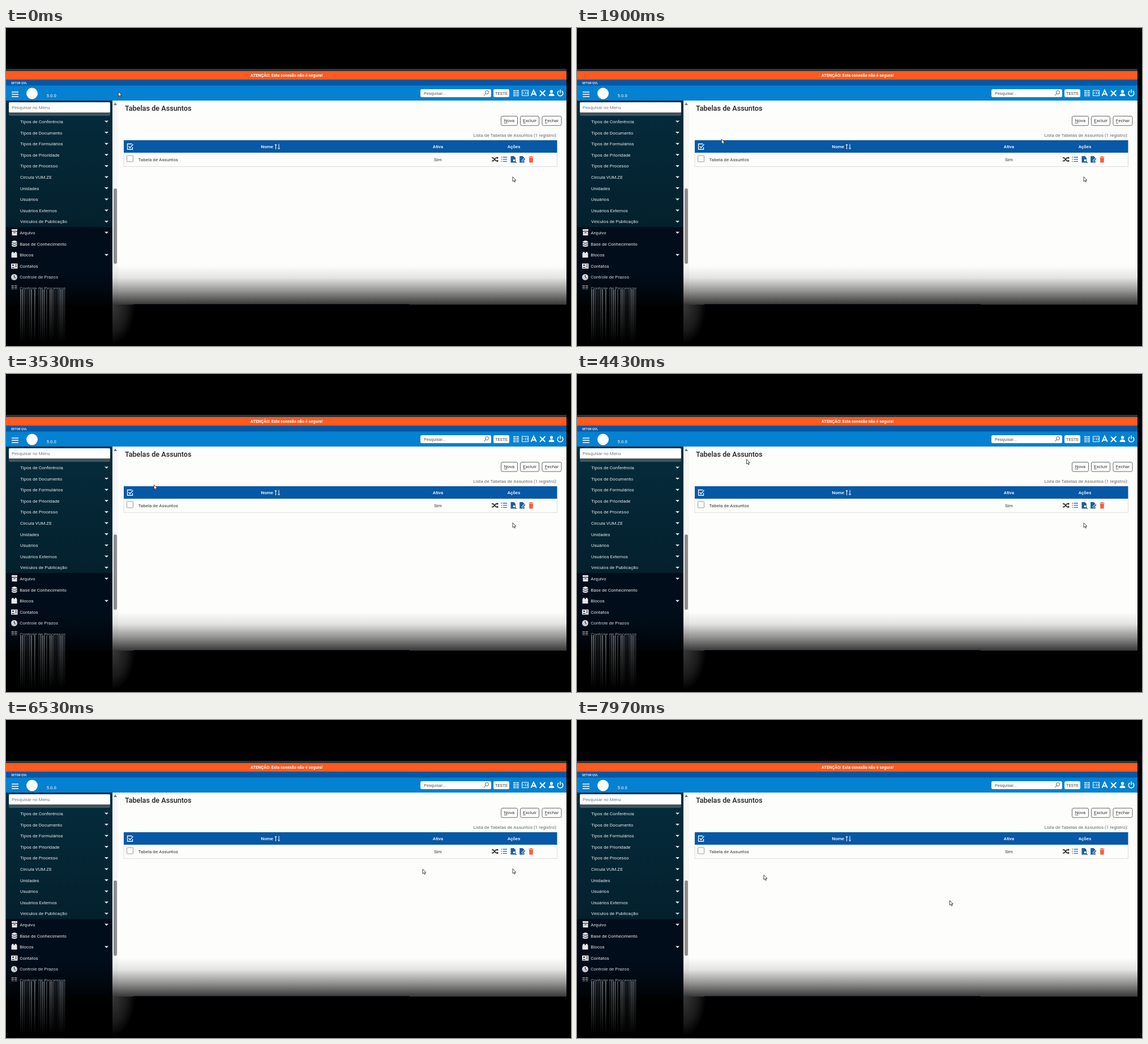
An HTML page for the animation above (8000 ms loop, 998 by 561 pixels).

```html
<!DOCTYPE html>
<html lang="pt-BR">
<head>
<meta charset="utf-8">
<style>
  html, body { margin: 0; width: 100%; height: 100%; overflow: hidden; background: #000; }
  svg { display: block; width: 998px; height: 561px; font: 8.05px Roboto, Arial, sans-serif; }
</style>
</head>
<body>
<svg viewBox="0 0 998 561">
  <defs>
    <linearGradient id="shade" x2="0" y2="1">
      <stop offset="0" stop-color="#000" stop-opacity="0"/>
      <stop offset=".3" stop-color="#000" stop-opacity=".1"/>
      <stop offset=".65" stop-color="#000" stop-opacity=".42"/>
      <stop offset="1" stop-color="#000" stop-opacity=".78"/>
    </linearGradient>
    <linearGradient id="smear" x2="0" y2="1">
      <stop offset="0" stop-color="#a9b0b5"/>
      <stop offset=".4" stop-color="#646a6e"/>
      <stop offset="1" stop-color="#000"/>
    </linearGradient>
    <linearGradient id="menu" x2="0" y2="1">
      <stop offset="0" stop-color="#052c3c"/>
      <stop offset="1" stop-color="#04202d"/>
    </linearGradient>
    <radialGradient id="glow" cx="0" cy="0" r="1">
      <stop offset="0" stop-color="#383838"/>
      <stop offset=".65" stop-color="#1a1a1a"/>
      <stop offset="1" stop-color="#000"/>
    </radialGradient>
    <clipPath id="menuClip"><path d="M0 128H188V461H0z"/></clipPath>
    <path id="arrow" d="M0 0V8.2L1.9 6.5 3.2 9.4 4.6 8.8 3.3 6H5.8z" fill="#fff" stroke="#333" stroke-width=".9"/>
  </defs>

  <!-- page and header -->
  <path d="M0 72H990V77H0z" fill="#303437"/>
  <path d="M0 76H990V91H0z" fill="#ff5a1f"/>
  <path d="M0 91H990V102H0z" fill="#0657a3"/>
  <path d="M0 101.500H990V128H0z" fill="#0481d1"/>
  <path d="M188 128H990V488H188z" fill="#fdfdfc"/>
  <text x="495.500" y="86" font-size="7.35" font-weight="600" fill="#fff" text-anchor="middle">ATENÇÃO: Esta conexão não é segura!</text>
  <text x="9" y="99" font-size="5.4" font-weight="500" fill="#fff">SETOR QVL</text>
  <path d="M10 113h12M10 117h12M10 121h12" stroke="#fff" stroke-width="1.7"/>
  <circle cx="46" cy="115.500" r="10" fill="#fff"/>
  <text x="71.500" y="122" font-size="7.8" fill="#fff">5.0.0</text>
  <rect x="732" y="108" width="125" height="14" rx="2.500" fill="#fff"/>
  <text x="738" y="117.500" font-size="7.5" fill="#555">Pesquisar...</text>
  <g fill="none" stroke="#555"><circle cx="849.500" cy="113.500" r="3"/><path d="M847.300 115.700l-3 3.300"/></g>
  <rect x="861" y="108" width="28" height="14" rx="2.500" fill="#fff"/>
  <text x="875" y="117.700" font-size="7.5" fill="#444" text-anchor="middle">TESTE</text>
  <g fill="none" stroke="#fff" stroke-width="1.5">
    <path d="M896 110.500h4.500m1 0h4.500M896 113.500h4.500m1 0h4.500M896 116.500h4.500m1 0h4.500M896 119.500h4.500m1 0h4.500"/>
    <rect x="911.500" y="110" width="11" height="9.500" stroke-width="1"/>
    <path d="M913.500 113v3.500M916 113h1.500v3.500H916M919 113h2v3.500h-2" stroke-width=".8"/>
    <path d="M927.500 119.700L932 109.500 936.800 119.700M929.300 116.500h5.700" stroke-width="1.9"/>
    <path d="M943 110.500l9.500 9.300M952.500 110l-9.700 10" stroke-width="2"/>
    <path d="M976.400 111a4.800 4.800 0 1 0 5.200 0M979 108.500v6"/>
  </g>
  <g fill="#fff"><circle cx="963.500" cy="112" r="2.700"/><path d="M958.500 120q0-4.500 5-4.500t5 4.500z"/></g>

  <!-- side menu -->
  <path d="M0 128H188V351H0z" fill="url(#menu)"/>
  <path d="M0 351H188V488H0z" fill="#010d1a"/>
  <rect x="5" y="145" width="179" height="10" rx="2" fill="#40545d"/>
  <rect x="5" y="131" width="179" height="18" rx="1.500" fill="#fff"/>
  <text x="10" y="143" font-size="7.9" fill="#777">Pesquisar no Menu</text>
  <g id="items" clip-path="url(#menuClip)" fill="#e4e9ec"></g>
  <path d="M188 128H198V488H188z" fill="#f6f6f6"/>
  <rect x="190" y="283" width="6" height="133" rx="3" fill="#8d8d8d"/>
  <path d="M190 136l3-4.500 3 4.500z" fill="#777"/>

  <!-- content -->
  <text x="210" y="146" font-size="12.65" font-weight="500" fill="#222">Tabelas de Assuntos</text>
  <g id="buttons" fill="#333" text-anchor="middle"></g>
  <text x="973.500" y="191.700" fill="#666" text-anchor="end">Lista de Tabelas de Assuntos (1 registro):</text>
  <path d="M208 220V244.500H973.500V220" fill="none" stroke="#ddd"/>
  <path d="M208 198H973.500V220H208z" fill="#0758a6"/>
  <g fill="#fff" font-weight="500" text-anchor="middle">
    <text x="461" y="212">Nome</text><text x="763" y="212">Ativa</text><text x="897" y="212">Ações</text>
  </g>
  <g fill="none" stroke="#fff">
    <path d="M222.500 204.500H214.500V214H223.500V210M216.500 208.500l2.500 2.700 5.500-6" stroke-width="1.3"/>
    <path d="M476.500 214v-9m-1.800 2l1.800-2 1.800 2M482 204.500v9m-1.800-2l1.800 2 1.800-2"/>
  </g>
  <rect x="213.500" y="225" width="11" height="11" rx="1" fill="#fff" stroke="#999"/>
  <text x="233.500" y="235" fill="#333">Tabela de Assuntos</text>
  <text x="763" y="235" fill="#333" text-anchor="middle">Sim</text>
  <g fill="none" stroke="#111" stroke-width="1.5">
    <path d="M858 229h2.500l5 5.500h3M858 234.500h2.500l5-5.500h3"/>
    <path d="M867.500 227l2.500 2-2.500 2zM867.500 232.500l2.500 2-2.500 2z" fill="#111" stroke="none"/>
    <path d="M874.500 228h1.500m1.500 0h7.500M874.500 231.700h1.500m1.500 0h7.500M874.500 235.400h1.500m1.500 0h7.500" stroke="#226cae" stroke-width="1.300"/>
  </g>
  <g fill="#1d5f9e">
    <path id="doc" d="M891.500 226h5.500l3 3v8.500h-8.500z"/>
    <use href="#doc" x="15.700"/>
  </g>
  <circle cx="897.500" cy="233.500" r="2.300" fill="#fff" stroke="#1d5f9e"/>
  <path d="M899.200 235.200l2.500 2.800" stroke="#1d5f9e" stroke-width="1.300"/>
  <path d="M911.500 235.500l5-5" stroke="#fff" stroke-width="3.400"/>
  <path d="M911.800 235.300l5-5" stroke="#1d5f9e" stroke-width="1.800"/>
  <path d="M923.500 227h2.300l.6-1h2.200l.6 1h2.300v1.200h-8zM924 229h7l-.4 8.500h-6.200z" fill="#f2603c"/>

  <!-- shaded lower edge -->
  <path d="M0 420H990V488H0z" fill="url(#shade)"/>
  <path d="M225 487.500H713" stroke="#080818"/>
  <path d="M188 488H228V558H188z" fill="url(#glow)"/>
  <g id="streaks" fill="url(#smear)"></g>

  <use id="second" href="#arrow"/>
  <use id="main" href="#arrow"/>
</svg>
<script>
const byId = id => document.getElementById(id);
const ROW = 19.6;

const icons = {
  box: '<path d="M10 355h10v3H10zM10.500 359h9v7h-9z"/><path d="M13 361h4" stroke="#010d1a"/>',
  disks: '<path d="M10 377q5-4 9.500 0v7.500q-4.500 3-9.500 0z"/><path d="M10 378.500q5 3 9.500 0M10 382q5 3 9.500 0" fill="none" stroke="#010d1a"/>',
  blocks: '<path d="M9.500 397h1v-2h3v2h2v-2h3v2h1v8h-10z"/>',
  card: '<path d="M9 415.500h11.500v9H9z"/><circle cx="12.500" cy="418.500" r="1.300" fill="#010d1a"/><path d="M10.500 422.500h4M16 418h3M16 421h3" stroke="#010d1a"/>',
  clock: '<circle cx="14.500" cy="439.500" r="5.500"/><path d="M14.500 436v3.500l2.500 1.500" fill="none" stroke="#010d1a"/>',
  grid: '<path d="M9.500 455h4.500m1 0h4.500M9.500 458h4.500m1 0h4.500M9.500 461h4.500m1 0h4.500" stroke="#e4e9ec" stroke-width="1.500"/>'
};

// label, has submenu, icon
const items = [
  ...['Tipos de Conferência', 'Tipos de Documento', 'Tipos de Formulários', 'Tipos de Prioridade',
    'Tipos de Processo', 'Circula VUM.ZE', 'Unidades', 'Usuários', 'Usuários Externos',
    'Veículos de Publicação'].map(label => [label, true]),
  ['Arquivo', true, 'box'], ['Base de Conhecimento', false, 'disks'], ['Blocos', true, 'blocks'],
  ['Contatos', false, 'card'], ['Controle de Prazos', false, 'clock'], ['Controle de Processos', false, 'grid']
];
byId('items').innerHTML = items.map(([label, submenu, icon], i) => {
  const y = 165 + i * ROW;
  return `<text x="${icon ? 24.2 : 25}" y="${y + 3}">${label}</text>` +
    (submenu ? `<path d="M174 ${y - 1.5}h7l-3.5 3.500z"/>` : '') + (icon ? icons[icon] : '');
}).join('');

byId('buttons').innerHTML = [['Nova', 874.5, 29], ['Excluir', 908.5, 33], ['Fechar', 947, 34]].map(([label, x, w]) =>
  `<rect x="${x}" y="155.500" width="${w}" height="16.500" rx="2.500" fill="#fff" stroke="#666"/>
   <text x="${x + w / 2}" y="166.300"><tspan text-decoration="underline">${label[0]}</tspan>${label.slice(1)}</text>`).join('');

// Vertical smears below the cut-off menu row: [start, end] of each group
byId('streaks').innerHTML = [[25, 47], [50, 53], [57, 67], [71, 73], [77, 104]].map(([from, to]) => {
  let bars = '';
  for (let x = from; x < to; x += 3.2) {
    const opacity = 0.45 + 0.25 * Math.sin(x * 2.3);
    bars += `<rect x="${x}" y="461" width="1.700" height="94" opacity="${opacity}"/>`;
  }
  return bars;
}).join('');

// [time, x, y] of each pointer tip
const mainPath = [[0, 198.5, 112.5], [1070, 274.8, 167.5], [2800, 233.5, 228.5], [4430, 299.5, 150.5],
  [4530, 299.5, 150.5], [5500, 895, 262.5], [6100, 895, 262.5], [7270, 377.3, 264], [7330, 377.3, 264], [7970, 330, 273.5]];
const secondPath = [[0, 895, 262.5], [6700, 895, 262.5], [7270, 748, 320.5], [7330, 748, 320.5], [7970, 658.5, 318.5]];

function place(pointer, path, time) {
  const next = path.findIndex(point => point[0] > time);
  const [t0, x0, y0] = path.at(next < 0 ? -1 : next - 1);
  const [t1, x1, y1] = path.at(next);
  const u = next < 0 ? 0 : (time - t0) / (t1 - t0);
  const eased = u * u * (3 - 2 * u);
  pointer.setAttribute('transform', `translate(${x0 + (x1 - x0) * eased} ${y0 + (y1 - y0) * eased})`);
}

const start = performance.now();
function draw() {
  const time = (performance.now() - start) % 8000;
  place(byId('main'), mainPath, time);
  place(byId('second'), secondPath, time);
  requestAnimationFrame(draw);
}
draw();
</script>
</body>
</html>
```
